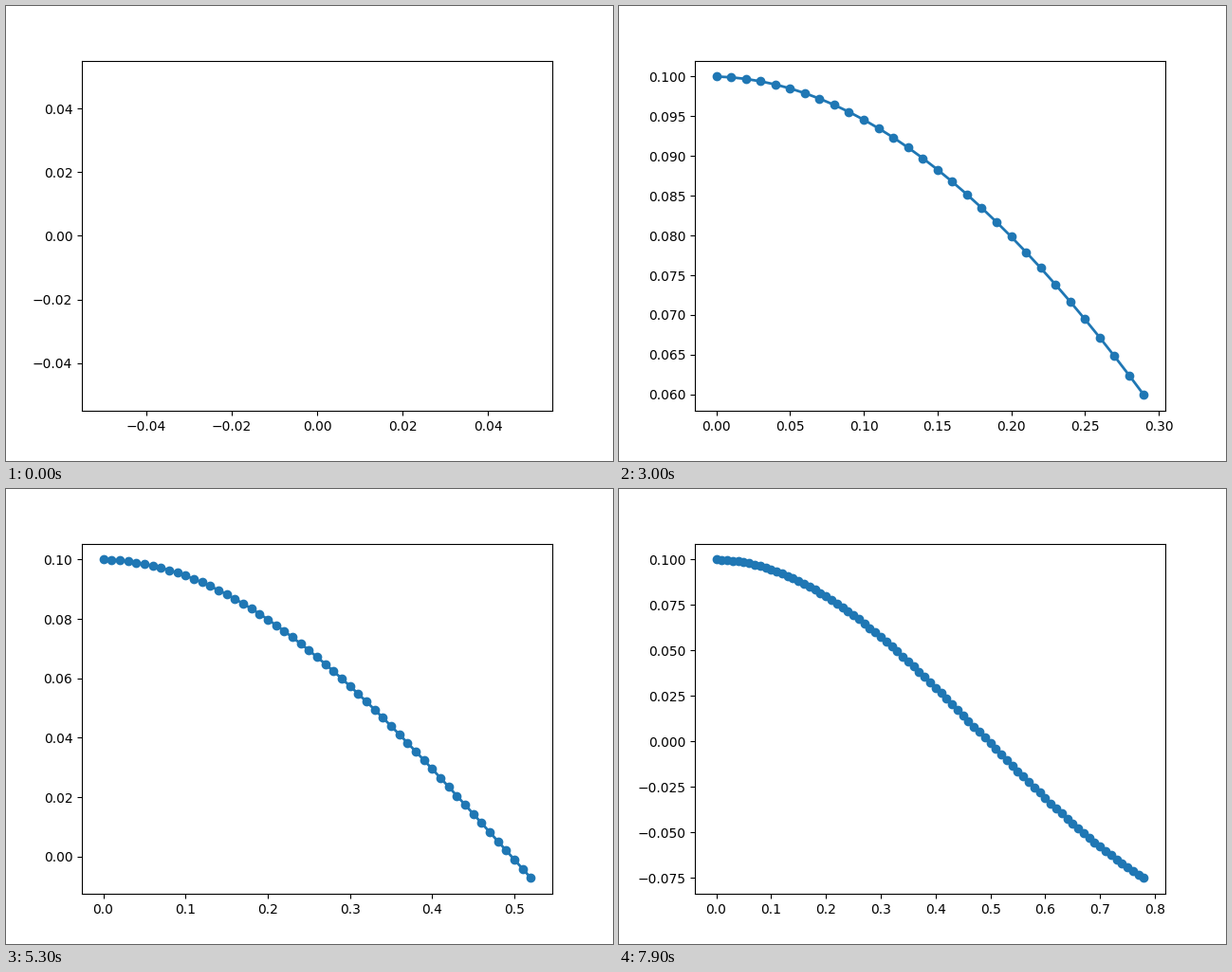
Write a matplotlib script that moves like this. It is 640 px wide and 480 px high and loops after 8000 ms.

```python
import matplotlib.pyplot as plt
import numpy as np
from matplotlib.animation import FuncAnimation

FRAMES = 80
DT = 0.01
STIFFNESS, DAMPING, MASS = 10.0, 0.1, 1.0


def simulate(steps, x=0.1, v=0.0):
    """Damped spring, integrated with semi-implicit Euler."""
    xs = []
    for _ in range(steps):
        xs.append(x)
        v += (-STIFFNESS * x - DAMPING * v) / MASS * DT
        x += v * DT
    return np.array(xs)


times = np.arange(FRAMES) * DT
positions = simulate(FRAMES)

fig, ax = plt.subplots(figsize=(6.4, 4.8), dpi=100)
line, = ax.plot([], [], "o-", lw=2)


def update(n):
    line.set_data(times[:n], positions[:n])
    ax.relim()
    ax.autoscale_view()
    return line,


anim = FuncAnimation(fig, update, frames=FRAMES, interval=100,
                     repeat=True, repeat_delay=0, blit=False)
plt.show()
```
